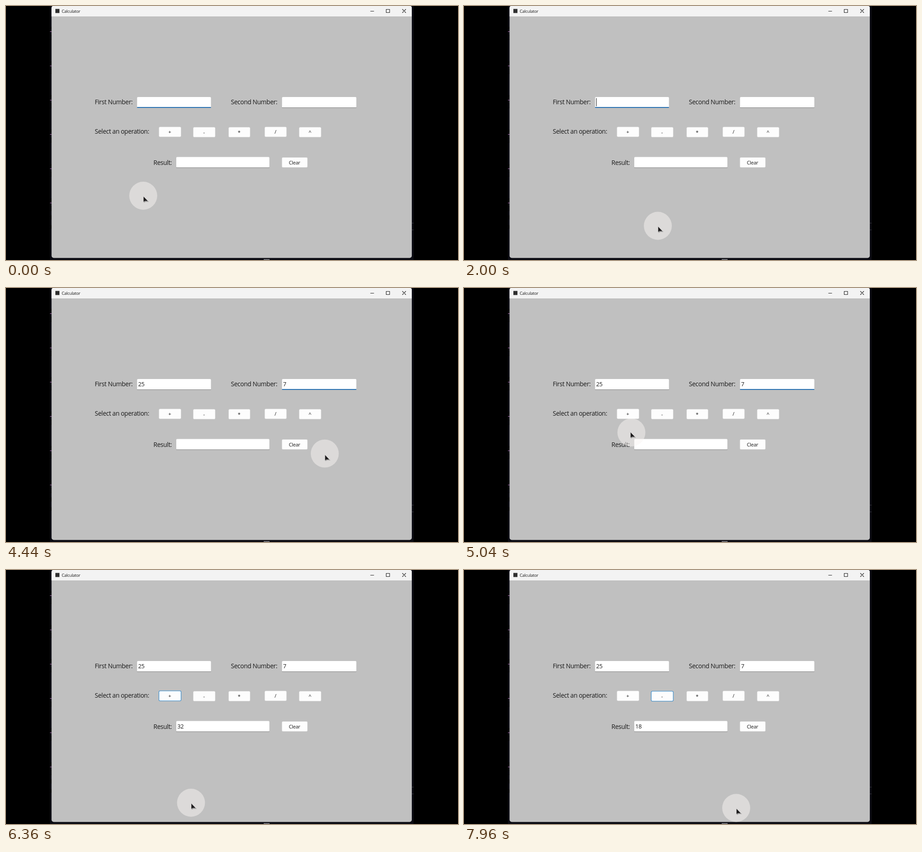
Animation, 998 px wide and 561 px high, one loop 8000 ms. Source, as an HTML page:

```html
<!DOCTYPE html>
<html lang="en">
<head>
<meta charset="utf-8">
<title>Calculator</title>
<style>
  html, body { margin: 0; width: 100%; height: 100%; overflow: hidden; background: #000; }
  svg { display: block; width: 998px; height: 561px; }
  text { font-family: "Open Sans", "Noto Sans", sans-serif; fill: #191919; letter-spacing: -.028em; }
  .code text { font: bold 15px "Noto Sans Mono", monospace; letter-spacing: 0; fill: inherit; }
  .label { font-size: 13.8px; }
  .value { font-size: 12.8px; }
  .key { font-size: 11px; text-anchor: middle; }
  .button rect { fill: #fdfdfd; stroke: #d2d2d2; stroke-width: .6; }
  .button.focus rect { stroke: #2b86cb; stroke-width: 1.1; }
  .button.hover rect { fill: #e0eef9; stroke: #0078d4; stroke-width: 1; }
  .line { fill: #858585; }
  .focus .line { fill: #1263ac; }
</style>
</head>
<body>
<svg viewBox="0 0 998 561">
  <rect width="998" height="561"/>
  <rect x="97" width="803" height="561" fill="#0c0c13"/>
  <g id="code" class="code"></g>
  <path d="M896 479.5h4M896 494.5h4" stroke="#3a3a42"/>
  <path d="M569 560h13" stroke="#77777c" stroke-width="2"/>
  <rect x="100.6" y="-.5" width="795.4" height="557" rx="5" fill="#c0c0c0"/>
  <path d="M100.6 23V4a4 4 0 0 1 4-4H892a4 4 0 0 1 4 4V23Z" fill="#f3f3f3"/>
  <rect x="109" y="6.5" width="9" height="9" fill="#303030"/>
  <text x="123" y="15" font-size="9.3">Calculator</text>
  <path d="M804.5 11.500h8M839.5 7.500h7.5v7h-7.500ZM875 7l8 8M883 7l-8 8"
        fill="none" stroke="#222" stroke-width="1.1"/>
  <g id="form"></g>
  <path id="caret" d="M292.3 203.500V221.500" stroke="#222" stroke-width="1.1"/>
  <circle id="halo" r="30.9" fill="#f9f4f3" fill-opacity=".49"/>
  <g id="arrow">
    <path d="M1 2V13.500L4.500 11.500H12Z" fill="#555" opacity=".5"/>
    <path d="M0-.5V11.800L3.200 9.800H9.800Z" fill="#1c1a1b" stroke="#eee" stroke-width=".4"/>
  </g>
</svg>
<script>
const LOOP = 8000, STEP = 40, LEAD = 5;
const TYPE = 2200, SECOND = 3360, SEVEN = 4080, PLUS = 5360, MINUS = 7400;
const $ = id => document.getElementById(id);
const code = $("code"), form = $("form");

function add(parent, tag, attrs, text = "") {
  const el = document.createElementNS("http://www.w3.org/2000/svg", tag);
  for (const k in attrs) el.setAttribute(k, attrs[k]);
  el.textContent = text;
  return parent.appendChild(el);
}

// Slivers of the editor showing behind the window
const sliver = (y, fill, text) => add(code, "text", { x: 96, y, fill }, text);
for (let i = 0; i < 6; i++) {
  const y = 56 + i * 75.7;
  sliver(y, "#b474bc", "S");
  add(code, "rect", { x: 97, y, width: 4, height: 1, fill: "#b474bc" });
  sliver(y + 18.5, "#527cb0", "l");
}
sliver(472, "#6189a0", "t");
sliver(492, "#9a9aa0", "r");

const label = (x, y, text) => add(form, "text", { class: "label", x, y }, text);

function field(x, y, width) {
  const g = add(form, "g", {});
  add(g, "rect", { x, y, width, height: 23.5, rx: 2, fill: "#fff" });
  const line = add(g, "rect", { class: "line", x, width });
  const value = add(g, "text", { class: "value", x: x + 2.3, y: y + 16.4 });
  return (text, focus) => {
    const height = focus ? 1.8 : 1;
    value.textContent = text;
    g.setAttribute("class", focus ? "focus" : "");
    line.setAttribute("y", y + 24 - height);
    line.setAttribute("height", height);
  };
}

function button(x, y, w, text) {
  const h = 22;
  const g = add(form, "g", {});
  add(g, "rect", { x, y, width: w, height: h, rx: 2.5 });
  add(g, "text", { class: "key", x: x + w / 2 - .5, y: y + 15.4 }, text);
  return (px, py, focus) => {
    const hover = px > x && px < x + w && py > y && py < y + h;
    g.setAttribute("class", "button" + (hover ? " hover" : "") + (focus ? " focus" : ""));
  };
}

label(196, 216.5, "First Number:");
label(496.5, 216.5, "Second Number:");
label(196, 282.3, "Select an operation:");
label(325.5, 351, "Result:");
const first = field(289.5, 201, 163);
const second = field(609.5, 201, 164);
const result = field(376, 333.5, 205.5);
const buttons = [
  button(337.7, 267, 48.8, "+"),
  button(413.4, 267.7, 48.6, "-"),
  button(491.5, 267.7, 47.5, "*"),
  button(571.2, 267, 48.2, "/"),
  button(647.2, 267.7, 48.6, "^"),
  button(609.2, 334.5, 56.5, "Clear")
];

// Hand movements: from, until, end point, and a pull point for the curved ones
const origin = [303, 419];
const moves = [
  [240, 640, [357, 205]],
  [760, 1400, [428, 485.5], [380, 22]],
  [2400, 2440, [504, 464]],
  [2840, 3640, [704, 360], [740, 17]],
  [4400, 4720, [700, 492]],
  [4720, 5240, [359, 285], [299, 311]],
  [5360, 5800, [468, 453], [340, 680]],
  [6120, 6360, [408.5, 514]],
  [6360, 6560, [440, 501]],
  [6680, 7200, [432.5, 283.5], [734, 440]],
  [7520, 7960, [601, 525.5], [500, 580]]
];

function pointer(t) {
  let pos = origin;
  for (const [from, until, end, pull] of moves) {
    if (t < from) break;
    const u = Math.min(1, (t - from) / (until - from));
    const e = u * u * (3 - 2 * u), start = pos;
    pos = start.map((a, k) => {
      const c = pull ? pull[k] : (a + end[k]) / 2;
      return (1 - e) ** 2 * a + 2 * e * (1 - e) * c + e * e * end[k];
    });
  }
  return pos;
}

const place = (id, x, y) => $(id).setAttribute("transform", `translate(${x} ${y})`);

function draw(t) {
  const [x, y] = pointer(t);
  const [ax, ay] = pointer(t + LEAD);
  const px = ax + .5, py = ay + 2;
  place("halo", x, y);
  place("arrow", px, py);
  $("caret").setAttribute("visibility", t >= 2000 && t < TYPE ? "visible" : "hidden");
  first("25".slice(0, t < TYPE ? 0 : 1 + (t - TYPE) / STEP), t < SECOND);
  second(t < SEVEN ? "" : "7", t >= SECOND && t < PLUS);
  result(t < PLUS ? "" : t < MINUS ? "32" : "18", false);
  const active = t < PLUS ? -1 : t < MINUS ? 0 : 1;
  buttons.forEach((set, i) => set(px, py, i === active));
}

const begin = performance.now();
function tick() {
  const t = (performance.now() - begin) % LOOP;
  draw(Math.floor(t / STEP) * STEP);
  requestAnimationFrame(tick);
}
tick();
</script>
</body>
</html>
```
